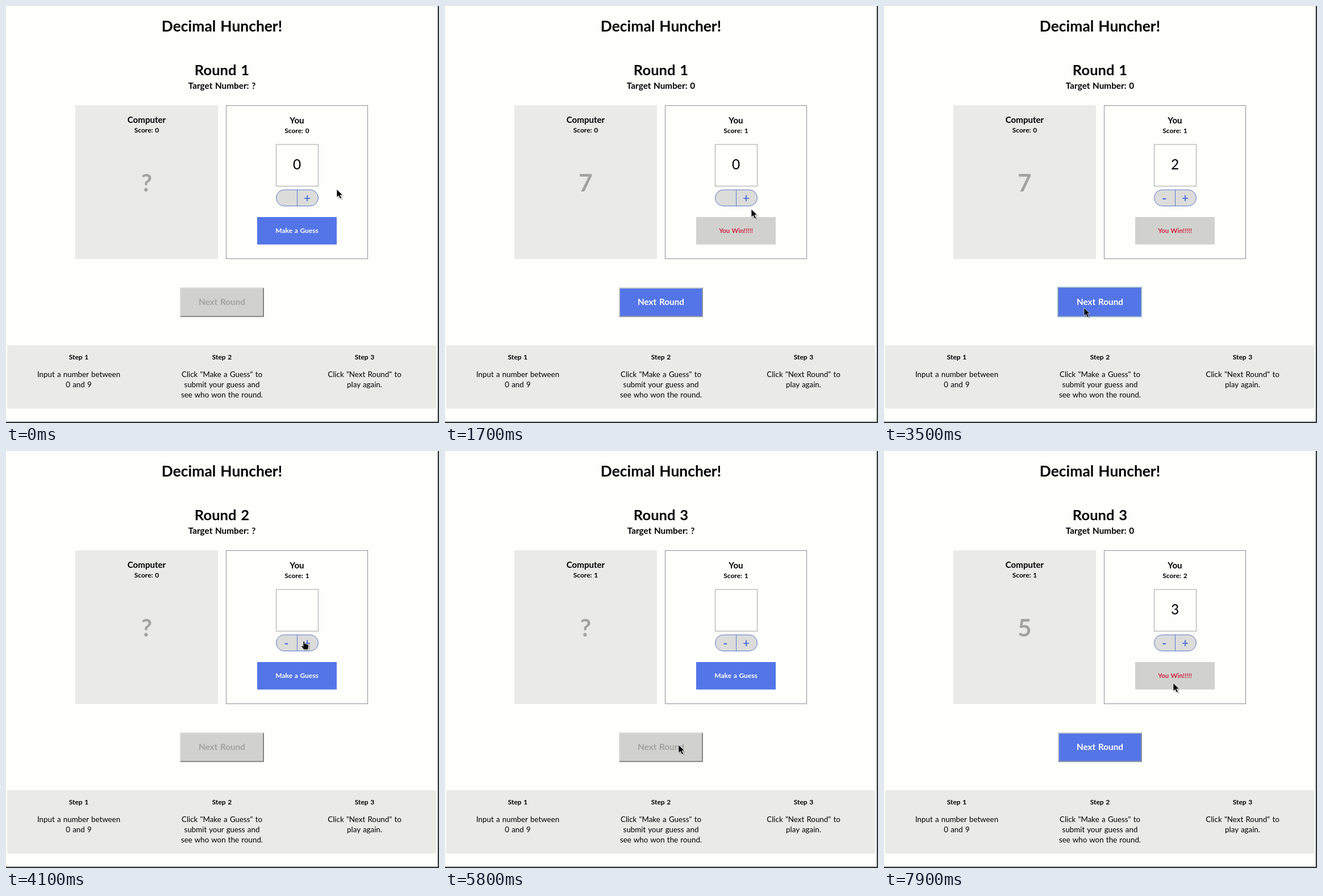
An HTML page for the animation above (8 s loop, 762 by 735 pixels).

```html
<!DOCTYPE html>
<html lang="en">
<head>
<meta charset="utf-8">
<title>Decimal Huncher!</title>
<style>
  html, body { margin: 0; width: 100%; height: 100%; overflow: hidden; background: #fefffb; }
  svg { display: block; width: 762px; height: 735px; }
  text { font: 700 12px Lato, "Open Sans", sans-serif; word-spacing: .06em; text-anchor: middle; fill: #000; }
  .panel { fill: #eaebe7; }
  .grey { fill: #d1d2ce; }
  .blue { fill: #5475e7; }
  .off { fill: #a2a39f; }
  .on { fill: #fefffb; }
  .win { fill: #cf2340; }
  .sign { fill: #5475d6; }
  .name { font-size: 15.1px; }
  #steps text.line { font-weight: 400; font-size: 13.35px; }
</style>
</head>
<body>
<svg viewBox="0 0 762 735">
  <rect width="762" height="735" fill="#fefffb"/>
  <path d="M761 0V734H0" fill="none" stroke="#303436" stroke-width="2.4"/>

  <text x="380" y="45" style="font-size:26.4px">Decimal Huncher!</text>
  <text id="round" x="380" y="122" style="font-size:25.6px"></text>
  <text id="target" x="380" y="146" style="font-size:15.3px"></text>

  <rect class="panel" x="122" y="175" width="251" height="271"/>
  <text class="name" x="247.5" y="206">Computer</text>
  <text id="computerScore" x="247.5" y="223"></text>
  <text id="computerValue" class="off" x="247.5" y="327" style="font-size:42px"></text>
  <text id="computerWin" class="win" x="247.5" y="409" style="font-size:13.1px">Computer Wins!!!</text>

  <rect x="387.5" y="175.5" width="249" height="270" fill="none" stroke="#8f9091"/>
  <text class="name" x="512" y="207">You</text>
  <text id="yourScore" x="512" y="224"></text>
  <rect x="475.5" y="244" width="74" height="73.5" fill="none" stroke="#a3a49f"/>
  <text id="value" x="512" y="288" style="font-size:24.5px;font-weight:400"></text>
  <rect x="475.5" y="324" width="74" height="28.5" rx="14.2" fill="#dcdcda" stroke="#5b78cf"/>
  <path d="M512.5 324V352" stroke="#5b78cf"/>
  <text id="minus" class="sign" x="493.3" y="347" style="font-size:22px">-</text>
  <text class="sign" x="530" y="346" style="font-size:20px">+</text>
  <rect id="guess" x="442" y="372" width="140" height="48.4"/>
  <text id="guessLabel" x="512" y="400"></text>

  <rect id="next" x="306" y="496" width="148" height="52"/>
  <g id="edges" fill="none" stroke-width="2">
    <path id="edgeLight" d="M307 548V497H454"/>
    <path id="edgeDark" d="M307 547.3H453V497"/>
  </g>
  <g id="ring" fill="none">
    <rect x="305.5" y="495.5" width="148" height="52.5" stroke="#bcd4ee" stroke-width="2"/>
    <rect x="306.5" y="496.5" width="146" height="50.5" stroke="#7d9c9c"/>
  </g>
  <text id="nextLabel" x="380" y="527" style="font-size:15.3px">Next Round</text>

  <rect class="panel" x="2" y="598" width="755.5" height="111.5"/>
  <g id="steps"></g>

  <g id="cursor" stroke="#fff" stroke-width=".7" stroke-linejoin="round">
    <g id="arrow">
      <path d="M2 3V17L6 14L8 19L11 18L9 13H13Z" stroke="none" opacity=".18"/>
      <path d="M0 0V14.2L3.5 11.2L5.8 16.8L8.4 15.6L6 10.2H10.5Z"/>
    </g>
    <g id="hand">
      <path d="M-2 8L2 4L11 6V14L8 17H1Z" stroke="none" opacity=".18"/>
      <path d="M-1 .8Q.3 -.4 1.5 .8V4.7L7 6Q8.2 6.5 8.2 8V11L7 15H0L-4 9.5Q-4.2 7.8 -2.6 8L-1 9.4Z"/>
    </g>
  </g>
</svg>

<script>
const LOOP = 8000, TICK = 100;
const $ = id => document.getElementById(id);

const steps = [
  [128, "Input a number between", "0 and 9"],
  [380, 'Click "Make a Guess" to', "submit your guess and", "see who won the round."],
  [631, 'Click "Next Round" to', "play again."]
];
steps.forEach(([x, ...lines], i) => {
  addText(x, 623, "Step " + (i + 1));
  lines.forEach((line, n) => addText(x, 654 + 18 * n, line, "line"));
});

function addText(x, y, content, cls = "") {
  const el = document.createElementNS("http://www.w3.org/2000/svg", "text");
  el.setAttribute("x", x);
  el.setAttribute("y", y);
  el.setAttribute("class", cls);
  el.textContent = content;
  $("steps").append(el);
}

// What the player does: clicks per button, and cursor moves as start, end, x, y.
const clicks = {
  guess: [1000, 4900, 7800],
  plus: [2100, 2300, 4200, 4400, 6600, 6900, 7200],
  next: [3600, 5800]
};
const home = [582, 323];
const moves = [
  [0, 600, 548, 387], [1300, 1400, 546, 381], [1500, 2000, 535, 345],
  [2400, 2900, 531, 391], [3000, 3300, 337, 546], [3400, 3500, 352, 532],
  [3600, 4100, 524, 335], [4500, 4800, 521, 386], [4900, 5000, 521, 382],
  [5100, 5400, 459, 471], [5400, 5600, 411, 518], [5800, 6400, 524, 343],
  [7200, 7600, 512, 390], [7800, 7900, 509, 409]
];
const computerPicks = [7, 0, 5], target = 0;

const easeOut = k => 1 - (1 - k) ** 2;

function cursorAt(t) {
  let at = home;
  for (const [from, to, ...goal] of moves) {
    if (t < from) break;
    const k = easeOut(Math.min(1, (t - from) / (to - from)));
    at = at.map((v, i) => v + (goal[i] - v) * k);
  }
  return at.map(Math.round);
}

const inside = ([x, y], left, top, right, bottom) => x >= left && x < right && y >= top && y < bottom;

const act = {
  plus(game) { game.value = Number(game.value) + 1; },
  guess(game) {
    const pick = computerPicks[game.round - 1];
    const youWin = Math.abs(game.value - target) <= Math.abs(pick - target);
    game.winner = youWin ? "you" : "computer";
    game.score[game.winner]++;
  },
  next(game) { Object.assign(game, { round: game.round + 1, value: "", winner: "" }); }
};

// Replays the game up to t; the cursor shape is only refreshed when it moves.
function play(t) {
  const game = { round: 1, value: 0, winner: "", score: { you: 0, computer: 0 }, hand: false, cursor: home };
  for (let now = 0; now <= t; now += TICK) {
    for (const button in clicks) if (clicks[button].includes(now)) act[button](game);
    const cursor = cursorAt(now);
    if (String(cursor) !== String(game.cursor)) {
      game.hand = inside(cursor, 512, 323, 550, 353) || (!game.winner && inside(cursor, 442, 372, 582, 420));
    }
    game.cursor = cursor;
  }
  game.pressed = clicks.next.includes(t + TICK);
  return game;
}

const show = (id, visible) => { $(id).style.display = visible ? "" : "none"; };
const write = (id, content) => { $(id).textContent = content; };
const paint = (id, cls) => $(id).setAttribute("class", cls);

function render(t) {
  const { round, value, winner, score, hand, cursor, pressed } = play(t);
  const youWin = winner === "you";

  write("round", "Round " + round);
  write("target", "Target Number: " + (winner ? target : "?"));
  write("computerScore", "Score: " + score.computer);
  write("yourScore", "Score: " + score.you);
  write("computerValue", winner ? computerPicks[round - 1] : "?");
  write("value", value);
  show("minus", value !== 0);
  show("computerWin", winner === "computer");

  paint("guess", winner ? "grey" : "blue");
  paint("guessLabel", youWin ? "win" : winner ? "off" : "on");
  write("guessLabel", youWin ? "You Win!!!!!" : "Make a Guess");
  $("guessLabel").style.fontSize = youWin ? "11.4px" : "12px";

  paint("next", winner ? "blue" : "grey");
  paint("nextLabel", winner ? "on" : "off");
  $("edgeLight").setAttribute("stroke", winner ? "#cacbc9" : "#dddedb");
  $("edgeDark").setAttribute("stroke", winner ? "#8d929f" : "#858683");
  show("edges", !pressed);
  show("ring", pressed);

  show("hand", hand);
  show("arrow", !hand);
  $("cursor").setAttribute("transform", `translate(${cursor})`);
}

const start = performance.now();
let last = -1;
function frame() {
  const t = Math.floor(((performance.now() - start) % LOOP) / TICK) * TICK;
  if (t !== last) render(last = t);
  requestAnimationFrame(frame);
}
frame();
</script>
</body>
</html>
```
